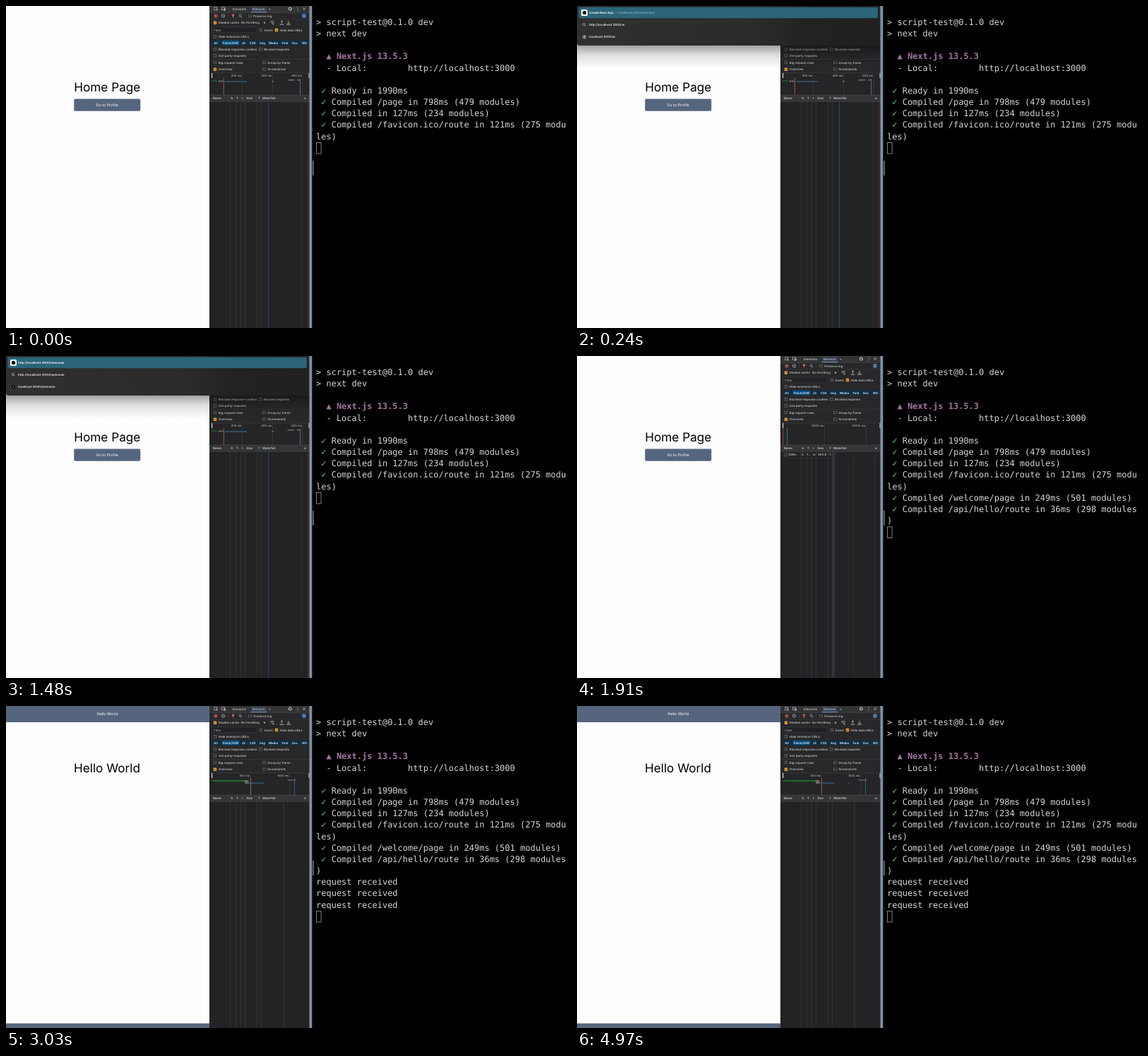
An HTML page with a canvas that plays this animation: 800 by 456 pixels, repeating every 5000 ms.

```html
<!DOCTYPE html>
<html lang="en">
<head>
<meta charset="utf-8">
<title>Dev server demo</title>
<style>
html, body { margin: 0; width: 800px; height: 456px; overflow: hidden; background: #000; }
canvas { display: block; }
</style>
</head>
<body>
<canvas id="stage" width="800" height="456"></canvas>
<script>
const ctx = document.getElementById('stage').getContext('2d');
const SANS = 'Inter, "Liberation Sans", sans-serif';
const MONO = '"DejaVu Sans Mono", monospace';
const LOOP = 5000;
// Key moments in ms
const OPEN = 120, TYPE = 200, KEY = 130, MATCH = 1100, SUBMIT = 1600,
      COMPILED = 1750, LOADED = 2060, SETTLED = 2600, MARKED = 3870;
ctx.textRendering = 'geometricPrecision';

function box(x, y, w, h, color) {
  ctx.fillStyle = color;
  ctx.fillRect(x, y, w, h);
}
function round(x, y, w, h, r, color) {
  ctx.fillStyle = color;
  ctx.beginPath();
  ctx.roundRect(x, y, w, h, r);
  ctx.fill();
}
function frame(x, y, w, h, color, width = .7) {
  ctx.strokeStyle = color;
  ctx.lineWidth = width;
  ctx.strokeRect(x, y, w, h);
}
function text(s, x, y, size, color, { weight = 400, align = 'left', font = SANS } = {}) {
  ctx.font = `${weight} ${size}px ${font}`;
  ctx.fillStyle = color;
  ctx.textAlign = align;
  ctx.fillText(s, x, y);
}
function ring(x, y, r, color, width = .7) {
  ctx.strokeStyle = color;
  ctx.lineWidth = width;
  ctx.beginPath();
  ctx.arc(x, y, r, 0, 7);
  ctx.stroke();
}
function dot(x, y, r, color) {
  ctx.fillStyle = color;
  ctx.beginPath();
  ctx.arc(x, y, r, 0, 7);
  ctx.fill();
}
// Open path from a flat list of x, y pairs
function path(color, ...p) {
  ctx.strokeStyle = color;
  ctx.lineWidth = .8;
  ctx.beginPath();
  for (let i = 0; i < p.length; i += 2) ctx.lineTo(p[i], p[i + 1]);
  ctx.stroke();
}
function triangle(x, y, r, color) {
  ctx.fillStyle = color;
  ctx.beginPath();
  ctx.moveTo(x - Math.abs(r), y + r * .8);
  ctx.lineTo(x + Math.abs(r), y + r * .8);
  ctx.lineTo(x, y - r);
  ctx.fill();
}
function magnifier(x, y, color) {
  ring(x - .5, y - .5, 1.6, color);
  path(color, x + .7, y + .7, x + 2.3, y + 2.3);
}

function page(t) {
  box(0, 0, 288, 456, '#fdfdfe');
  const mid = { align: 'center' };
  if (t < LOADED) {
    text('Home Page', 143.3, 121.3, 17.2, '#000', mid);
    round(96.3, 131.5, 94, 17.2, 1.8, '#56657e');
    text('Go to Profile', 143.2, 142.2, 5.4, '#fff', mid);
  } else {
    box(0, 0, 288, 23, '#56657e');
    box(0, 449.5, 288, 7, '#56657e');
    text('Hello World', 143.2, 13.1, 5.4, '#fff', mid);
    text('Hello World', 143, 93.8, 17.2, '#000', mid);
  }
}

function label(s, x, y, color = '#c9cacc') {
  text(s, x, y + 1.6, 4.35, color, { weight: 500 });
}
function check(s, x, y, on) {
  if (on) {
    round(x - 2.2, y - 2.2, 4.4, 4.4, .8, '#f0a23c');
    path('#4a2c08', x - 1.2, y, x - .3, y + 1, x + 1.3, y - 1.1);
  } else frame(x - 1.8, y - 1.8, 3.6, 3.6, '#77797c', .6);
  label(s, x + 4.8, y);
}

function toolbar() {
  const grey = '#b5b7ba', blue = '#7cacf8', red = '#e46962';
  box(288, 0, 142, 456, '#28282a');
  box(288, 0, 142, 9, '#343437');
  frame(294.8, 1.8, 4, 4, grey);
  path(grey, 297, 4, 300, 6.5);
  frame(305.3, 2, 4.6, 3.6, grey);
  box(308.5, 3.5, 2, 3.2, grey);
  label('Elements', 321, 4);
  box(347, 0, 22, 9, '#3d3f43');
  label('Network', 349, 4, '#a8c7fa');
  box(347, 8.3, 22, .8, blue);
  label('»', 372, 4);
  ring(402.3, 4, 1.9, grey, 1.2);
  for (const y of [2, 4, 6]) dot(413, y, .6, grey);
  path(grey, 420.2, 2, 424, 5.8);
  path(grey, 424, 2, 420.2, 5.8);
  box(288, 9, 142, .6, '#47484b');

  ring(297, 14, 2.3, red);
  box(296, 13, 2, 2, red);
  ring(307.5, 14, 2.3, grey);
  path(grey, 306, 12.5, 309, 15.5);
  triangle(321.5, 13.5, -2.2, red);
  box(321, 14, 1, 2.5, red);
  magnifier(332, 14, grey);
  box(314, 11.5, .5, 5, '#55565a');
  box(338.5, 11.5, .5, 5, '#55565a');
  check('Preserve log', 345.5, 14);
  round(418.5, 10.5, 7, 7, 1, '#26384f');
  ring(422, 14, 1.8, blue, 1.2);
  box(288, 18.6, 142, .5, '#3a3b3e');

  check('Disable cache', 296, 23.8, true);
  label('No throttling', 333, 23.8);
  triangle(366, 24, -1.5, grey);
  path(grey, 374, 22.5, 377, 21.3, 380, 22.5);
  path(grey, 375.3, 24.3, 377, 23.4, 378.5, 24.3);
  dot(378.6, 25.6, 1, grey);
  for (const [x, d] of [[390.5, 1], [400, -1]]) {
    path(grey, x, 21, x, 25);
    path(grey, x - 1.5, 23 - d, x, 23 - d * 2, x + 1.5, 23 - d);
    path(grey, x - 2.3, 25, x - 2.3, 26.4, x + 2.3, 26.4, x + 2.3, 25);
  }

  box(292, 30, 62, 7.8, '#202124');
  frame(292, 30, 62, 7.8, '#3f4144', .5);
  label('Filter', 294.3, 34, '#a0a2a5');
  check('Invert', 361, 34);
  check('Hide data URLs', 383, 34, true);
  check('Hide extension URLs', 296, 43.2);

  const types = [['All', 297], ['Fetch/XHR', 318], ['JS', 336.5], ['CSS', 349.2], ['Img', 363],
    ['Media', 378.5], ['Font', 395], ['Doc', 409], ['WS', 422.5]];
  for (const [s, x] of types) {
    const w = s.length * 2.3 + 4.5, on = s === 'Fetch/XHR';
    round(x - w / 2, 48.6, w, 6.8, 1.6, on ? '#074a78' : '#0c2f49');
    text(s, x, 53.7, 4.3, '#d9ebfb', { weight: 600, align: 'center' });
  }

  check('Blocked response cookies', 296, 61.2);
  check('Blocked requests', 360.3, 61.2);
  check('3rd-party requests', 296, 70.4);
  box(288, 75, 142, .5, '#3f4043');
  check('Big request rows', 296, 80);
  check('Group by frame', 365.4, 80);
  check('Overview', 296, 89.8, true);
  check('Screenshots', 365.4, 89.8);
}

function ruler(marks) {
  for (const [s, x] of marks) {
    box(x, 95, .6, 31, '#424346');
    text(s + ' ms', x - 1, 100.4, 4, '#c9cacc', { align: 'right' });
  }
}
function overview(t) {
  box(288, 95, 142, 31, '#252527');
  box(288, 94.7, 142, .5, '#424346');
  if (t < SUBMIT) {
    ruler([[200, 334], [400, 377], [600, 419.5]]);
    box(291, 105.5, 8, 1, '#257a3d');
    box(301, 105.5, 2, 2, '#777');
    box(303.5, 105.5, 4, 2, '#666');
    box(307.8, 102, 1, 24, '#9b5b38');
    box(310, 106.5, 31, 1, '#3f719c');
    box(376, 106, 3, 1.4, '#3c7784');
    box(398.5, 104.4, 10, 1, '#8d8f91');
    box(412, 104.4, 5, 1, '#8d8f91');
    box(416, 103, .8, 23, '#6e7890');
  } else if (t < LOADED) {
    ruler([[5000, 350], [10000, 409]]);
    box(291.4, 102, .9, 24, '#a44338');
    box(297.2, 102, .9, 24, '#2d7f7b');
  } else if (t < SETTLED) {
    ruler([[200, 325.5], [400, 359.5], [600, 394], [800, 428.5]]);
    box(292, 105.3, 58, 1.3, '#238b3c');
    box(350, 105, 6.5, 5, '#686b68');
    box(356.5, 108.6, 26.5, 1, '#416c8b');
    box(360, 102, 1, 24, '#a06032');
  } else {
    ruler([[500, 345.8], [1000, 401]]);
    box(292, 105.3, 46, 1.3, '#238b3c');
    box(338, 105, 5.5, 5, '#686b68');
    box(343.5, 108.6, 21, 1, '#416c8b');
    box(346, 102, 1, 24, t < MARKED ? '#7b7048' : '#a04a38');
    box(384, 108.8, 2, .8, '#5e6265');
    box(398.5, 104.4, 12, 1, '#777a7d');
    box(408, 102, .9, 24, '#37678c');
  }
  for (const x of [291, 428.5]) box(x, 95, 1.2, 7, '#d2d3d5');
}

function table(t) {
  box(288, 126, 142, 9, '#353538');
  box(288, 135, 142, 321, '#232326');
  for (const x of [317, 324.8, 332.3, 338.3, 355.3, 361]) box(x, 126, .6, 330, '#3c3d40');
  const heads = [['Name', 292.7], ['S.', 318.3], ['T.', 326], ['I.', 334], ['Size', 340.3], ['T', 357], ['Waterfall', 363]];
  for (const [s, x] of heads) label(s, x, 130.4, '#dcddde');
  triangle(423.5, 130.5, 1.3, '#c9cacc');
  box(288, 125.8, 142, .5, '#4b4c4f');
  box(288, 135, 142, .5, '#4b4c4f');
  if (t < SUBMIT) {
    box(371.2, 135, .9, 321, '#1f4f78');
    box(418, 135, .5, 321, '#39393c');
    box(427, 135, .8, 321, '#6e2d2f');
  } else if (t < LOADED) {
    box(362.5, 135, .8, 321, '#27598a');
    box(364.3, 135, .7, 321, '#6e2d2f');
    box(391.8, 135, .5, 321, '#3a3a3d');
    box(421.5, 135, .5, 321, '#3a3a3d');
    frame(294, 138, 3.8, 3.8, '#777a7d', .6);
    const cells = [['598e…', 299.5], ['2.', 318], ['f…', 326], ['w', 334], ['360 B', 341], ['7.', 357]];
    for (const [s, x] of cells) label(s, x, 139.7);
    box(288, 144.5, 142, .4, '#343437');
  } else if (t < SETTLED) box(401.8, 135, .8, 321, '#274a70');
  else box(392.6, 135, .7, 321, '#434548');
}

function dropdown(t) {
  if (t < OPEN || t >= SUBMIT) return;
  const n = Math.max(0, Math.min(7, 1 + Math.floor((t - TYPE) / KEY)));
  const url = 'localhost:3000/' + 'welcome'.slice(0, n);
  const shade = ctx.createLinearGradient(0, 56, 0, 88);
  shade.addColorStop(0, 'rgba(0,0,0,.36)');
  shade.addColorStop(.4, 'rgba(0,0,0,.13)');
  shade.addColorStop(1, 'rgba(0,0,0,0)');
  box(0, 56, 430, 32, shade);
  const glass = ctx.createLinearGradient(0, 0, 428, 0);
  glass.addColorStop(0, '#303031');
  glass.addColorStop(.6, '#2b2b2c');
  glass.addColorStop(.75, '#222223');
  glass.addColorStop(1, '#202021');
  round(0, -4, 428.5, 60, [0, 0, 3, 3], glass);
  round(2.5, 1.8, 423.5, 15.4, 2, '#2b6478');
  round(6, 5, 9, 9, 1.5, '#fff');
  dot(10.5, 9.5, 2.7, '#111');
  const bold = { weight: 600 }, size = 4.35;
  if (t < MATCH) {
    text('Create Next App', 17, 11.1, size, '#fff', bold);
    text('— localhost:3000/welcome', 53.8, 11.1, size, '#9fc6d4');
  } else text('http://' + url, 17, 11.1, size, '#fff', bold);
  magnifier(10.3, 26.5, '#b9babb');
  text('http://' + url, 17, 28.2, size, '#e8e8e8', bold);
  if (n === 7) {
    dot(10.5, 43.8, 2.5, '#080808');
    dot(10.5, 43.8, .7, '#ddd');
  } else {
    ring(10.5, 43.8, 2.2, '#b9babb');
    path('#b9babb', 8.3, 43.8, 12.7, 43.8);
    path('#b9babb', 10.5, 41.6, 10.5, 46);
  }
  text(url, 17, 45.4, size, '#e8e8e8', bold);
}

const rowY = r => 27 + r * 16.16;
const colX = c => 439 + c * 7.224;
function mono(s, col, row, color = '#d3d5d4', weight = 400) {
  text(s, colX(col), rowY(row), 12, color, { weight, font: MONO });
}
function done(s, row) {
  mono('✓', 1, row, '#63e06b', 700);
  mono(s, 3, row);
}
function terminal(t) {
  box(429.5, 0, 4, 456, '#8090a5');
  box(433.5, 0, 366.5, 456, '#000');
  mono('> script-test@0.1.0 dev', 0, 0);
  mono('> next dev', 0, 1);
  mono('▲ Next.js 13.5.3', 2, 3, '#a274a2', 700);
  mono('- Local:        http://localhost:3000', 2, 4);
  done('Ready in 1990ms', 6);
  done('Compiled /page in 798ms (479 modules)', 7);
  done('Compiled in 127ms (234 modules)', 8);
  done('Compiled /favicon.ico/route in 121ms (275 modu', 9);
  mono('les)', 0, 10);
  let row = 11;
  if (t >= COMPILED) {
    done('Compiled /welcome/page in 249ms (501 modules)', 11);
    done('Compiled /api/hello/route in 36ms (298 modules', 12);
    mono(')', 0, 13);
    row = 14;
  }
  for (let i = 0; i < 3; i++)
    if (t >= LOADED + i * 40) mono('request received', 0, row++);
  frame(439.5, rowY(row) - 11.3, 6.6, 15.6, '#8b8d8c', .9);
  box(434.5, 219, 1, 21, '#b5b7b8');
}

function draw() {
  const t = performance.now() % LOOP;
  page(t);
  toolbar();
  overview(t);
  table(t);
  dropdown(t);
  terminal(t);
  requestAnimationFrame(draw);
}
draw();
</script>
</body>
</html>
```
